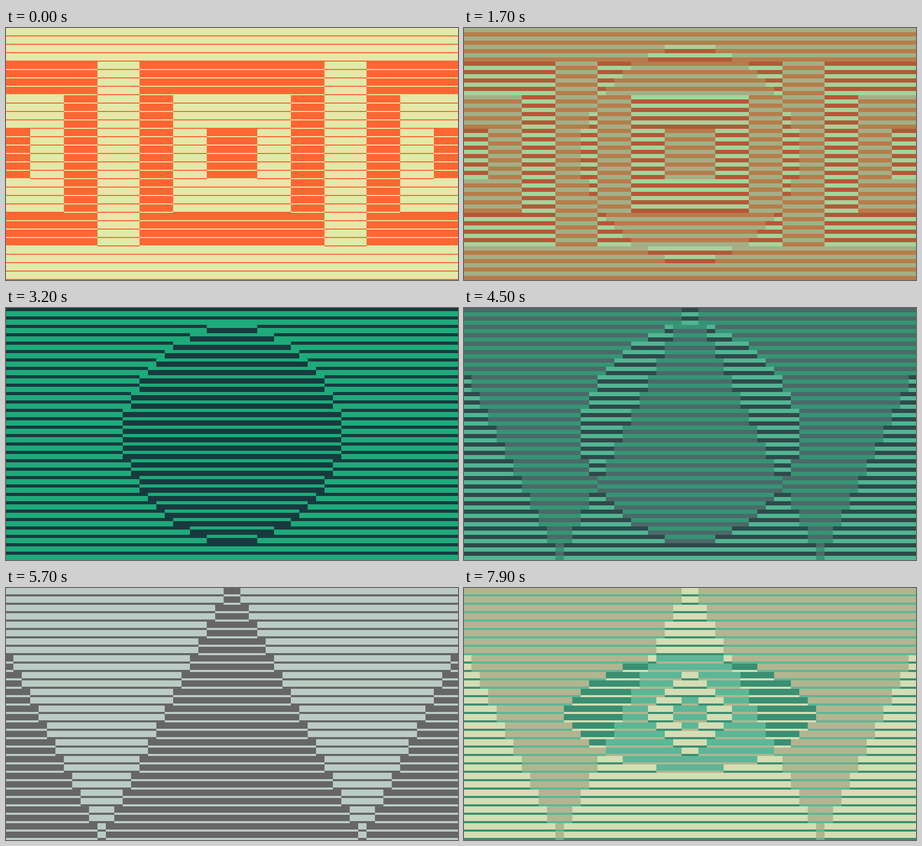
Animation of 860 by 480 pixels, one loop 8000 ms. Source, as an HTML page with a canvas:

```html
<!DOCTYPE html>
<html lang="en">
<head>
<meta charset="utf-8">
<title>Shutter stripes</title>
<style>
html, body { margin: 0; width: 100%; height: 100%; overflow: hidden; }
canvas { display: block; }
</style>
</head>
<body>
<canvas id="stage" width="860" height="480"></canvas>
<script>
const ctx = document.getElementById('stage').getContext('2d');
const CELL = 16, ROWS = 30, HALF_COLS = 27, CENTER = 430;
const LOOP = 8000, TICK = 100, HOLD_TICK = 58;
const SCENE_TICKS = 28, FADE_START = 11.3, FADE_TICKS = 17.7;

const ORANGE = [255, 102, 51], BEIGE = [228, 232, 169];
const DARK = [23, 58, 62], GREEN = [30, 170, 122];
const GRAY = [102, 102, 102], PALE = [187, 204, 196];

const CIRCLE = [3, 5, 7, 8, 9, 10, 11, 11, 12, 12, 13, 13, 13];
const EYE = [4, 8, 10, 12, 13, 14, 15];

// Shapes are mirrored: col counts cells away from the centre line.
const mirrorRow = row => Math.min(row, ROWS - 1 - row);

function crosses(col, row) {
  const across = Math.floor((Math.abs(13 - col) + 1) / 4);
  const down = Math.floor(mirrorRow(row) / 4);
  return Math.min(across, down) % 2 === 1;
}

function circle(col, row) {
  return col < (CIRCLE[mirrorRow(row) - 2] || 0);
}

function triangles(col, row) {
  return Math.min(col, 30 - col) <= Math.floor(row / 2);
}

function eye(col, row) {
  const r = mirrorRow(row);
  const white = col < (EYE[r - 8] || 0);
  const iris = col < r - 9, pupil = col < r - 12;
  return white && (!iris || pupil);
}

const scenes = [
  { inside: crosses, colors: [BEIGE, ORANGE] },
  { inside: circle, colors: [DARK, GREEN] },
  { inside: triangles, colors: [PALE, GRAY] },
  { inside: eye, colors: [GREEN, BEIGE] }
];

const mix = (a, b, t) =>
  `rgb(${a.map((v, i) => Math.round(v + (b[i] - v) * t)).join(',')})`;

function draw(time) {
  let tick = Math.floor((time % LOOP) / TICK);
  if (tick >= HOLD_TICK) tick--;

  const since = tick - FADE_START;
  const index = Math.max(0, Math.floor(since / SCENE_TICKS));
  const fade = Math.min(1, Math.max(0, (since - index * SCENE_TICKS) / FADE_TICKS));
  const from = scenes[index], to = scenes[index + 1];
  const palette = from.colors.map(a => to.colors.map(b => mix(a, b, fade)));

  const shift = 2 * Math.floor(1.2 + tick * 8 / 7) % (2 * CELL);
  const flipped = shift >= CELL ? 1 : 0;
  const split = CELL - shift % CELL;

  for (let row = 0; row < ROWS; row++) {
    const y = row * CELL;
    for (let col = 0; col < HALF_COLS; col++) {
      const a = from.inside(col, row) ^ flipped;
      const b = to.inside(col, row) ^ flipped;
      for (const x of [CENTER + col * CELL, CENTER - (col + 1) * CELL]) {
        ctx.fillStyle = palette[a][b];
        ctx.fillRect(x, y, CELL, split);
        ctx.fillStyle = palette[1 - a][1 - b];
        ctx.fillRect(x, y + split, CELL, CELL - split);
      }
    }
  }
}

const start = performance.now();
function loop() {
  draw(performance.now() - start);
  requestAnimationFrame(loop);
}
loop();
</script>
</body>
</html>
```
